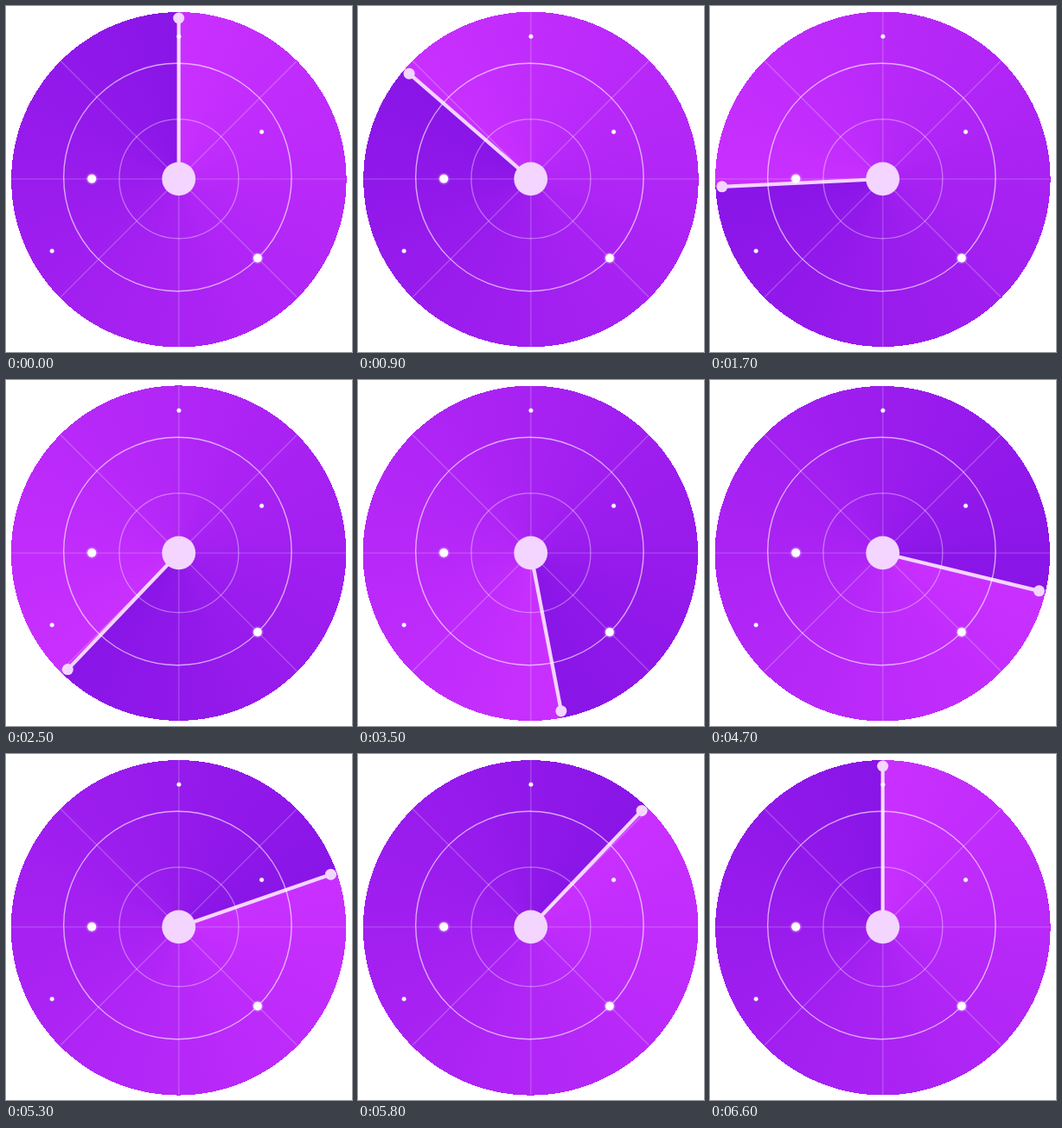
An HTML page with a canvas for the animation above (6700 ms loop, 400x400 px).

```html
<!DOCTYPE html>
<html lang="en">
<head>
<meta charset="utf-8">
<title>Radar</title>
<style>
  html, body { margin: 0; width: 100%; height: 100%; overflow: hidden; background: #fff; }
  canvas { display: block; width: 400px; height: 400px; }
</style>
</head>
<body>
<canvas id="stage" width="400" height="400"></canvas>
<script>
const ctx = document.getElementById('stage').getContext('2d');
const STEP = 100, STEPS = 67, TAU = Math.PI * 2;
const CX = 199.7, CY = 200, DISC = 193.7, HAND = 186;
const PALE = '#f3d5ff';
const white = a => `rgba(255,255,255,${a})`;

// x, y, radius
const blips = [
  [99.2, 199.8, 5], [290.9, 291.5, 4.9],
  [199.9, 35.3, 2.3], [295.6, 145.5, 2.3], [53.2, 283.2, 2.3]
];

function circle(x, y, r, fill) {
  ctx.beginPath();
  ctx.arc(x, y, r, 0, TAU);
  ctx.fillStyle = fill;
  ctx.fill();
}

function ring(x, y, r, width, alpha) {
  ctx.beginPath();
  ctx.arc(x, y, r, 0, TAU);
  ctx.lineWidth = width;
  ctx.strokeStyle = white(alpha);
  ctx.stroke();
}

function line(x1, y1, x2, y2, width, style) {
  ctx.beginPath();
  ctx.moveTo(x1, y1);
  ctx.lineTo(x2, y2);
  ctx.lineWidth = width;
  ctx.strokeStyle = style;
  ctx.stroke();
}

// Whole-pixel rows keep the rim hard-edged
function disc(turn) {
  const wob = turn - Math.PI / 4;
  const x = 199.6 + 0.35 * Math.cos(wob), y = 200.5 - 0.35 * Math.sin(wob);
  const fade = ctx.createConicGradient(-Math.PI / 2 - turn, CX, CY);
  fade.addColorStop(0, '#c930ff');
  fade.addColorStop(1, '#8915e7');
  ctx.fillStyle = fade;
  for (let row = 0; row < 400; row++) {
    const d = row + 0.5 - y;
    if (Math.abs(d) >= DISC) continue;
    const half = Math.sqrt(DISC * DISC - d * d);
    const left = Math.round(x - half);
    ctx.fillRect(left, row, Math.round(x + half) - left, 1);
  }
}

function hand(turn) {
  const x = CX - HAND * Math.sin(turn), y = CY - HAND * Math.cos(turn);
  line(CX, CY, x, y, 4.2, PALE);
  circle(x, y, 6.5, PALE);
}

function grid() {
  const soft = white(0.24), d = 136.5;
  line(6, 200, 393, 200, 1.2, soft);
  line(199.8, 7, 199.8, 394, 1.2, soft);
  line(CX - d, CY - d, CX + d, CY + d, 1.2, soft);
  line(CX - d, CY + d, CX + d, CY - d, 1.2, soft);
  ring(199.9, 199.8, 69, 1.3, 0.38);
  ring(198.4, 198, 131.7, 1.4, 0.62);
}

function blip([x, y, r]) {
  const glow = ctx.createRadialGradient(x, y, r * 0.7, x, y, r * 1.5);
  glow.addColorStop(0, white(0.5));
  glow.addColorStop(1, white(0));
  circle(x, y, r * 1.5, glow);
  circle(x, y, r, '#fff');
}

function draw(now) {
  const step = Math.floor(now / STEP) % STEPS;
  const turn = TAU * step / (STEPS - 1);
  ctx.fillStyle = '#fff';
  ctx.fillRect(0, 0, 400, 400);
  disc(turn);
  hand(turn);
  grid();
  blips.forEach(blip);
  circle(CX, CY - 0.2, 19.4, PALE);
}

const start = performance.now();
function loop() {
  draw(performance.now() - start);
  requestAnimationFrame(loop);
}
loop();
</script>
</body>
</html>
```
